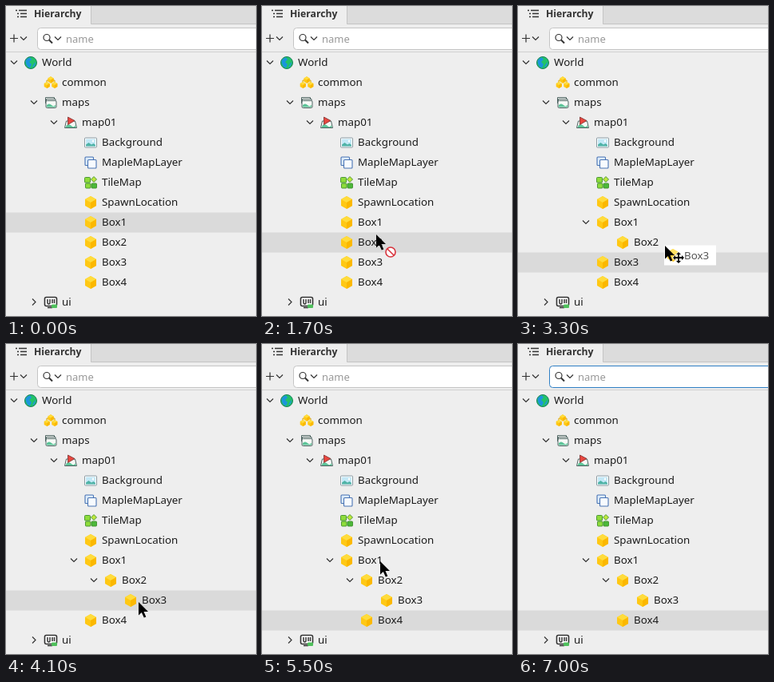
Animation, 313 px wide and 388 px high, one loop 7.8 s. Source, as an HTML page:

```html
<!DOCTYPE html>
<html lang="en">
<head>
<meta charset="utf-8">
<title>Hierarchy panel</title>
<style>
  html, body { margin: 0; height: 100%; overflow: hidden; background: #eee; }
  svg { display: block; width: 313px; height: 388px; }
  text { font: 13.35px "Noto Sans", "Open Sans", sans-serif; fill: #1c1c1c; }
  .title { font-size: 12.2px; font-weight: 700; fill: #333; }
  .hint { font-size: 13px; fill: #999; }
  .line { fill: none; stroke: #333; stroke-width: 1.2; }
</style>
</head>
<body>
<svg viewBox="0 0 313 388">
  <defs>
    <g id="box">
      <path d="M0-8 7-4V4L0 8-7 4V-4Z" fill="#ffc814"/>
      <path d="M0-8 7-4 0 0-7-4Z" fill="#ffdc3c"/>
      <path d="M7-4V4L0 8V0Z" fill="#fbb800"/>
    </g>
    <g id="globe">
      <circle r="7.5" fill="#22c268" stroke="#19805a"/>
      <path d="M-6.500-2Q-5-6-1-6.500L1-4-2-1 1 2-1 6.500Q-6 5-6.500-2ZM3 3 6-1Q6 4 2 6Z" fill="#1c94dc"/>
    </g>
    <g id="boxes">
      <path d="M-5 2V-3H5V2" fill="none" stroke="#d9a400"/>
      <use href="#box" transform="translate(0-3.5)scale(.52)"/>
      <use href="#box" transform="translate(-4.8 3)scale(.5)"/>
      <use href="#box" transform="translate(4.8 3)scale(.5)"/>
    </g>
    <g id="maps" fill="#f6f9f6" stroke="#4f6462">
      <path d="M-6.500 1V-6.500H4.500V-4M-5.500 1V-4.500H6V-2"/>
      <rect x="-6" y="-2.500" width="13" height="9" rx="1.5"/>
      <path d="M-5 5.500V3Q-2 0 1 3T6 2.500V5.500Z" fill="#5cc498" stroke="none"/>
    </g>
    <g id="map">
      <path d="M-5.500-2H5.500L7.500 6.500H-7.500Z" fill="#f6f9f6" stroke="#4f6462"/>
      <path d="M-6.500 6-5 3Q-2 1 1 4T6 3L6.500 6Z" fill="#5cc498"/>
      <path d="M-3.500-7 5-2.500-3.500 2.500Z" fill="#e8473f" stroke="#7c3030" stroke-width=".8"/>
    </g>
    <g id="picture">
      <rect x="-7.500" y="-6" width="15" height="12" rx="1" fill="#fff" stroke="#8a9ba3"/>
      <rect x="-6" y="-4.500" width="12" height="9" fill="#c3e8f6"/>
      <path d="M-6 4.500V2.500L-2.500 0 1 2.500 3.500 1 6 3V4.500Z" fill="#4fb3a6"/>
      <circle cx="3" cy="-2" r="1.200" fill="#fff"/>
    </g>
    <g id="layers" stroke="#4a74b4" stroke-width="1.1">
      <rect x="-7" y="-7" width="10.500" height="10.500" rx="1" fill="#dcebfb"/>
      <rect x="-3.500" y="-3.500" width="10.500" height="10.500" rx="1" fill="#f7fbff"/>
    </g>
    <g id="tiles" fill="#8fdc3c" stroke="#3f8f2c" stroke-width=".9">
      <rect x="-7.500" y="-6.500" width="7" height="6.500" rx="1"/>
      <path d="M4-7.500 7.500-4 4-.5.500-4Z" fill="#c0e83c"/>
      <rect x="-6.500" y="1" width="6.500" height="6" rx="1"/>
      <rect x="1" y="1" width="6.500" height="6" rx="1" fill="#4cb83a"/>
    </g>
    <g id="screen">
      <rect x="-7.500" y="-6.500" width="15" height="11" rx="2" fill="#fff" stroke="#333" stroke-width="1.600"/>
      <path d="M-4-4V0Q-4 2-2.500 2T-1 0V-4M2-4V1M4.500-4V1M-4 6.500H2" fill="none" stroke="#333" stroke-width="1.500"/>
      <rect x="1" y="2.500" width="7" height="4.500" rx="1" fill="#4fc05c"/>
    </g>
    <path id="open" class="line" d="M-4-2.500 0 1.500 4-2.500"/>
    <path id="closed" class="line" d="M-2-4.500 2-.5-2 3.500"/>
  </defs>

  <rect width="313" height="388" fill="#eee"/>
  <path d="M106 0H313V23H106Z" fill="#dcdcdc"/>
  <path d="M106.500 0V22.500H313" fill="none" stroke="#c4c4c4"/>
  <path d="M16 5.500H26M18 9.500H26M18 13.500H26M12 5.500H14M14 9.500H16M14 13.500H16" stroke="#333" stroke-width="1.500"/>
  <text class="title" x="35" y="14">Hierarchy</text>
  <path class="line" d="M5 40.500H15M10 35.500V45.500"/>
  <use href="#open" x="22" y="41"/>
  <rect id="search" x="39.500" y="27.500" width="290" height="27" rx="4" fill="#fff"/>
  <g class="line"><circle cx="51" cy="39.500" r="4"/><path d="M54 42.500 58 46.500" stroke-width="2"/></g>
  <use href="#open" x="65" y="41"/>
  <text class="hint" x="75" y="46">name</text>
  <path d="M0 57.500H313" stroke="#d0d0d0"/>

  <rect id="selection" width="313" height="25" fill="#dadada"/>
  <g id="tree"></g>
  <g id="ghost">
    <rect height="25" fill="#fff"/>
    <use href="#box" opacity=".8"/>
    <text style="fill:#555"></text>
  </g>
  <g id="cursor">
    <path d="M0 0V16.500L3.800 13 6.800 19.500 9.300 18.500 6.500 12H12Z"/>
    <g id="denied" transform="translate(18 22)" stroke="#d8333c" stroke-width="1.600">
      <circle r="6" fill="#fff"/><path d="M-4-4 4 4"/>
    </g>
    <path id="move" transform="translate(17 15)" stroke="#fff" stroke-width="1.400" paint-order="stroke"
      d="M0-7 3-4H1V-1H4V-3L7 0 4 3V1H1V4H3L0 7-3 4H-1V1H-4V3L-7 0-4-3V-1H-1V-4H-3Z"/>
  </g>
</svg>
<script>
const $ = id => document.getElementById(id);
const LOOP = 7800, STEP = 100;

// label, icon, depth, arrow
const rows = [
  ['World', 'globe', 0, 'open'], ['common', 'boxes', 1], ['maps', 'maps', 1, 'open'],
  ['map01', 'map', 2, 'open'], ['Background', 'picture', 3], ['MapleMapLayer', 'layers', 3],
  ['TileMap', 'tiles', 3], ['SpawnLocation', 'box', 3], ['Box1', 'box', 3], ['Box2', 'box', 3],
  ['Box3', 'box', 3], ['Box4', 'box', 3], ['ui', 'screen', 1, 'closed']
];

// Each drag: row, pressed, picked up, over a valid target, dropped, new depth, parent, ghost offset
const drags = [
  { row: 9, press: 1600, lift: 1700, valid: 1800, drop: 2200, depth: 4, parent: 8, dx: 14, dy: 9 },
  { row: 10, press: 3000, lift: 3100, valid: 3200, drop: 3800, depth: 5, parent: 9, dx: 10, dy: 12 },
  { row: 11, press: 4600, lift: 4700, valid: 4700, drop: 5500, depth: 4, parent: 8, dx: 17, dy: 8 }
];

// Pointer: time, x, y
const path = [
  [600, 300, 160], [1300, 148, 298], [1400, 146, 297], [1500, 146, 297], [1700, 143, 286],
  [2000, 146, 273], [2200, 146, 275], [2600, 147, 314], [2800, 147, 318], [3000, 147, 318],
  [3300, 184, 300], [3500, 184, 300], [3600, 182, 300], [3800, 182, 302], [4400, 150, 343],
  [4600, 148, 338], [4700, 150, 314], [5100, 148, 272], [5800, 148, 272],
  [6300, 226, 268], [6600, 296, 165], [6700, 306, 72], [7000, 306, 72]
];

function pointerAt(t) {
  const i = path.findIndex(p => p[0] > t);
  if (i < 1) return null;
  const [t0, x0, y0] = path[i - 1], [t1, x1, y1] = path[i];
  const k = (t - t0) / (t1 - t0);
  return [x0 + (x1 - x0) * k, y0 + (y1 - y0) * k];
}

const rowY = i => 71 + 25 * i;

function drawTree(t) {
  const now = rows.map(r => [...r]);
  for (const d of drags) if (t >= d.drop) {
    now[d.row][2] = d.depth;
    now[d.parent][3] = 'open';
  }
  $('tree').innerHTML = now.map(([label, icon, depth, arrow], i) => {
    const x = 25 * depth, y = rowY(i);
    return (arrow ? `<use href="#${arrow}" x="${x + 10}" y="${y}"/>` : '') +
      `<use href="#${icon}" x="${x + 31}" y="${y}"/><text x="${x + 45}" y="${y + 4}">${label}</text>`;
  }).join('');
  const selected = drags.filter(d => t >= d.press).pop()?.row ?? 8;
  $('selection').setAttribute('y', rowY(selected) - 12.5);
}

function set(el, attrs) {
  for (const name in attrs) el.setAttribute(name, attrs[name]);
}

const show = (id, on) => $(id).setAttribute('display', on ? 'inline' : 'none');

function drawPointer(t) {
  const at = pointerAt(t);
  const drag = drags.find(d => t >= d.lift && t < d.drop);
  const valid = drag && t >= drag.valid;
  show('cursor', at);
  show('denied', drag && !valid);
  show('move', valid);
  show('ghost', valid);
  if (!at) return;
  const [x, y] = at.map(Math.round);
  set($('cursor'), { transform: `translate(${x} ${y})` });
  if (!valid) return;
  const [card, icon, label] = $('ghost').children;
  const cx = x + drag.dx, cy = y + drag.dy;
  set(card, { x: x - 1, y: cy - 12.5, width: drag.dx + 55 });
  set(icon, { x: cx, y: cy });
  set(label, { x: cx + 14, y: cy + 4.5 });
  label.textContent = rows[drag.row][0];
}

function frame() {
  const t = Math.floor(performance.now() % LOOP / STEP) * STEP;
  drawTree(t);
  drawPointer(t);
  set($('search'), { stroke: t >= 7000 ? '#2f7fc4' : '#c4c4c4' });
  requestAnimationFrame(frame);
}
frame();
</script>
</body>
</html>
```
